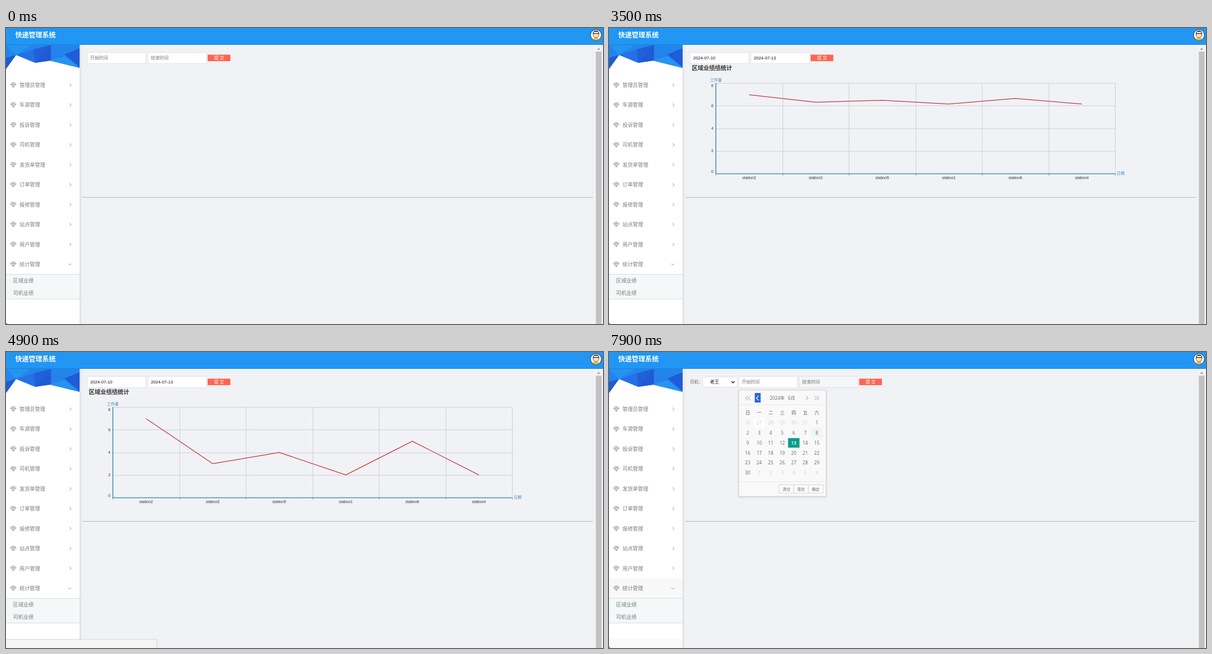
Write an HTML page that moves like this. It is 1063 px wide and 527 px high and loops after 8 s.

```html
<!DOCTYPE html>
<html lang="zh">
<head>
<meta charset="utf-8">
<title>管理系统</title>
<style>
html, body { margin: 0; width: 100%; height: 100%; overflow: hidden; background: #f1f2f5; }
svg { display: block; width: 1063px; height: 527px; }
text { font-family: "Noto Sans CJK SC", "Noto Sans CJK", sans-serif; }
.num { font-family: "Open Sans", "Noto Sans CJK SC", "Noto Sans CJK", sans-serif; }
.arial { font-family: "Liberation Sans", Arial, sans-serif; }
.float { filter: drop-shadow(0 1px 1.5px rgba(0,0,0,.16)); }
.drop { filter: drop-shadow(0 12px 15px rgba(0,0,0,.26)); }
</style>
</head>
<body>
<svg id="stage" viewBox="0 0 1063 527" xmlns="http://www.w3.org/2000/svg">
  <defs>
    <linearGradient id="edge"><stop offset="0" stop-color="#d9dbdf"/><stop offset="1" stop-color="#f1f2f5"/></linearGradient>
    <clipPath id="face"><circle cx="1050.5" cy="12.5" r="9.5"/></clipPath>
  </defs>
</svg>
<script>
const LOOP = 8000;
const stage = document.getElementById('stage');
const windows = [];

function add(parent, tag, attrs = {}) {
  const node = document.createElementNS('http://www.w3.org/2000/svg', tag);
  for (const key in attrs) node.setAttribute(key, attrs[key]);
  parent.appendChild(node);
  return node;
}
const group = (parent, attrs) => add(parent, 'g', attrs);
const rect = (parent, x, y, width, height, fill, more) =>
  add(parent, 'rect', { x, y, width, height, fill, ...more });
const path = (parent, d, stroke, width = 1, more) =>
  add(parent, 'path', { d, stroke, 'stroke-width': width, fill: 'none', ...more });
const shape = (parent, d, fill) => add(parent, 'path', { d, fill });

// y is the middle of the line of text
function label(parent, str, x, y, size, fill, more) {
  const node = add(parent, 'text', { x, y: y + size * 0.37, 'font-size': size, fill, ...more });
  node.textContent = str;
  return node;
}
const mid = { 'text-anchor': 'middle' };

function during(node, from, to = LOOP) {
  windows.push({ node, from, to });
  return node;
}

function drawHeader() {
  rect(stage, 0, 0, 1063, 30, '#2196f3');
  rect(stage, 0, 29, 1063, 1, '#1f83d4');
  label(stage, '快递管理系统', 16.5, 13, 12, '#fff', { 'font-weight': 700 });
  add(stage, 'circle', { cx: 1050.5, cy: 12.5, r: 9.7, fill: '#fff', stroke: '#27323a', 'stroke-width': 1 });
  const a = group(stage, { 'clip-path': 'url(#face)' });
  shape(a, 'M1042 24Q1044 17 1050.5 17T1059 24Z', '#f2c230');
  add(a, 'circle', { cx: 1050.5, cy: 12, r: 5.2, fill: '#fbe3cb', stroke: '#3a3030', 'stroke-width': .8 });
  shape(a, 'M1044.5 10.5Q1045 4.5 1050.5 4.5T1056.5 10.5Z', '#4a3a33');
  rect(a, 1046.5, 7, 8, 2, '#fff');
}

function drawBanner() {
  shape(stage, 'M0 30H131V71L78 58L52 62L18 48L0 73Z', '#2186ec');
  shape(stage, 'M0 53L18 48L0 73Z', '#205bd8');
  shape(stage, 'M0 30H45L18 48Z', '#2494f1');
  shape(stage, 'M18 48L49 38L52 62Z', '#2670e6');
  shape(stage, 'M49 38L80 30L52 62Z', '#2160da');
  shape(stage, 'M80 30V58L52 62Z', '#205ad6');
  shape(stage, 'M80 30L114 53L80 58Z', '#2482ea');
  shape(stage, 'M104 47L131 36V70Z', '#205bd8');
  shape(stage, 'M78 58L104 50L131 71Z', '#2494f1');
}

function drawSidebar() {
  rect(stage, 0, 30, 131, 497, '#fff');
  rect(stage, 131, 30, 4, 497, 'url(#edge)');
  drawBanner();
  during(rect(stage, 0, 403, 131, 35, '#f8f8f8'), 5000);
  during(rect(stage, 0, 511, 131, 16, '#f9f9f9'), 5300);
  rect(stage, 0, 438, 131, 45, '#f5f8f9');
  path(stage, 'M0 438.5H131M0 482.5H131', '#d9dcde');
  const items = ['管理员', '车源', '投诉', '司机', '发货单', '订单', '报修', '站点', '用户', '统计'];
  items.forEach((name, i) => {
    const y = 101.5 + i * 35.45;
    const icon = group(stage, { transform: `translate(13 ${y})` });
    path(icon, 'M-3-3.8H3L5-1L0 4.3L-5-1ZM-5-1H5M-2-1L0 4.3L2-1L0-3.8Z', '#858585', .75);
    label(stage, name + '管理', 24, y, 9.2, '#7c7c7c');
    const last = i === items.length - 1;
    path(stage, last ? `M111 ${y - 1}l2.5 2.5l2.5-2.5` : `M113.4 ${y - 2.5}l2.6 2.7l-2.6 2.7`, '#858585', .9);
  });
  label(stage, '区域业绩', 12.5, 450, 9.2, '#7c7c7c');
  label(stage, '司机业绩', 12.5, 471.5, 9.2, '#7c7c7c');
  shape(stage, 'M0 523.5Q.5 526.5 3.5 527H0Z', '#777');
}

function drawFrame() {
  path(stage, 'M136.5 30V301M1044.5 30V301', '#ebecef');
  path(stage, 'M136 301.5H1045', '#b2b4b6');
  rect(stage, 1049, 30, 13, 497, '#f3f3f4');
  rect(stage, 1050.3, 42, 10.2, 485, '#c1c1c1');
  shape(stage, 'M1052.3 38.7L1055.3 35.2L1058.3 38.7Z', '#a0a0a0');
}

function field(parent, x, hint, fill = '#fff') {
  rect(parent, x + .5, 43.5, 104.5, 20, fill, { stroke: '#dfe1e4' });
  return label(parent, hint, x + 6, 53.5, 7.9, '#757575');
}
const dateText = (parent, str, x) => label(parent, str, x + 6, 53.5, 7.7, '#111', { class: 'arial' });
const caret = (parent, x, from) => during(rect(parent, x + 6.2, 49, 1, 9, '#000'), from, from + 500);

function submit(parent, x) {
  rect(parent, x, 47.5, 40.5, 11.5, '#ff6451');
  label(parent, '提 交', x + 20.3, 53.3, 8, '#fff', { ...mid, 'font-weight': 500 });
}

// Line chart
const VALUES = [7, 3, 4, 2, 5, 2];
const pointX = i => 249.5 + i * 118.5;
const valueY = v => 259.5 - v * 20.1;

function drawChart(parent) {
  const g = during(group(parent), 3500);
  label(g, '区域业绩绩统计', 147.5, 71.5, 10.25, '#333', { 'font-weight': 700 });
  label(g, '工作量', 190.3, 92, 7, '#3f8dc4', mid);
  label(g, '日期', 904, 258.7, 7, '#3f8dc4');
  let grid = '', ticks = '';
  for (let i = 0; i < 7; i++) {
    const x = Math.round(190 + i * 118.5) + .5;
    grid += `M${x} 98V259`;
    ticks += `M${x} 259V262.5`;
  }
  for (let v = 2; v <= 8; v += 2) grid += `M190 ${Math.floor(valueY(v)) + .5}H901`;
  path(g, grid, '#cfd0d2');
  path(g, ticks, '#5a92b5');
  path(g, 'M190.3 98V260.3M189.5 259.5H901.5', '#4a90ba', 1.6);
  [102, 138.5, 178.5, 218.5, 255].forEach((y, i) =>
    label(g, 8 - i * 2, 186, y, 7, '#333', { class: 'arial', 'text-anchor': 'end' }));
  [2, 3, 5, 1, 6, 4].forEach((n, i) =>
    label(g, 'station' + n, pointX(i), 266.5, 7, '#333', { class: 'arial', ...mid }));
  return path(g, '', '#c4373c', 1.25, { 'stroke-linejoin': 'round' });
}

function moveLine(line, t) {
  const k = Math.min(1, Math.max(0, (t - 3453) / 1850));
  const p = k === 1 ? 1 : 1 - 2 ** (-10 * k);
  line.setAttribute('d', 'M' + VALUES.map((v, i) => `${pointX(i)} ${valueY(7 + (v - 7) * p).toFixed(2)}`).join('L'));
}

// Calendar; coordinates are relative to its corner
const popups = [];
const chevron = (x, dir) => `M${x + dir * 2} 10.4l${-dir * 4} 4.1l${dir * 4} 4.1`;

function drawMonth(parent, month, first, length, before) {
  label(parent, '2024年', 69, 14.5, 8.1, '#666', { class: 'num', ...mid });
  label(parent, month + '月', 94.5, 14.5, 8.1, '#666', { class: 'num', ...mid });
  for (let i = 0; i < 42; i++) {
    const n = i - first + 1;
    const inside = n > 0 && n <= length;
    const day = n < 1 ? before + n : inside ? n : n - length;
    const x = 16.5 + (i % 7) * 20.5, y = 58.7 + Math.floor(i / 7) * 17.8;
    const today = inside && day === 13;
    if (month === 6 && i === 1) rect(parent, x - 10, y - 8.5, 20, 17, '#fff');
    if (month === 6 && i === 13) rect(parent, x - 10, y - 8.5, 20.5, 17, '#eff6f3');
    if (today) rect(parent, x - 10.2, y - 8.5, 20.4, 17, '#0d9c8b');
    label(parent, day, x, y, 8.1, today ? '#fff' : inside ? '#666' : '#cfcfcf',
      { class: 'num', ...mid, 'font-weight': today ? 600 : 400 });
  }
}

function calendar(x, start, from, to) {
  const g = during(group(stage, { class: 'float' }), from, to);
  popups.push({ g, x, start });
  rect(g, .5, .5, 155.5, 189, '#f9f9f9', { stroke: '#d4d4d4' });
  path(g, 'M1 26.5H156M1 163.5H156', '#e6e6e6');
  path(g, chevron(14.5, 1) + chevron(19, 1) + chevron(34, 1) + chevron(122, -1) + chevron(137, -1) + chevron(141.5, -1), '#8a8a8a', .9);
  [...'日一二三四五六'].forEach((d, i) => label(g, d, 16.5 + i * 20.5, 40.8, 8, '#555', mid));
  ['清空', '现在', '确定'].forEach((s, i) => {
    rect(g, 72.5 + i * 26, 168.9, 26, 14.8, '#fdfdfd', { stroke: '#cfcfcf', 'stroke-width': .9 });
    label(g, s, 85.5 + i * 26, 176.5, 7, '#666', mid);
  });
  return g;
}
const july = parent => drawMonth(parent, 7, 1, 31, 30);

function bezier(p, x1, y1, x2, y2) {
  const at = (s, a, b) => 3 * a * s * (1 - s) ** 2 + 3 * b * s * s * (1 - s) + s ** 3;
  let lo = 0, hi = 1;
  for (let i = 0; i < 24; i++) {
    const m = (lo + hi) / 2;
    if (at(m, x1, x2) < p) lo = m; else hi = m;
  }
  return at(lo, y1, y2);
}

function movePopup({ g, x, start }, t) {
  const k = Math.min(1, Math.max(0, (t - start) / 300));
  const p = k === 1 ? 1 : bezier(k, .25, .1, .25, 1);
  g.setAttribute('transform', `translate(${x} ${(67.5 + 11.5 * (1 - p)).toFixed(2)})`);
  g.setAttribute('opacity', (.3 + .7 * p).toFixed(3));
}

function drawAreaPage() {
  const g = during(group(stage), 0, 5100);
  during(field(g, 144, '开始时间'), 0, 1200);
  during(dateText(g, '2024-07-10', 144), 1200);
  during(field(g, 252, '结束时间'), 0, 2400);
  during(dateText(g, '2024-07-13', 252), 2400);
  caret(g, 144, 500);
  caret(g, 252, 1700);
  submit(g, 359);
  return drawChart(g);
}

const DRIVERS = ['请选择', '老张', '老李', '老刘', '老叶', '老王', '老魏', '老韩', '老蒋'];

function drawDriverPage() {
  const g = during(group(stage), 5100);
  label(g, '司机：', 144, 53.5, 7.7, '#666');
  rect(g, 166.5, 44.5, 62, 18, '#fff', { stroke: '#dfe1e4', rx: 1 });
  during(label(g, '请选择', 180, 53.5, 8, '#111'), 5100, 6400);
  during(label(g, '老王', 180, 53.5, 8, '#111'), 6400);
  path(g, 'M218.3 52.3l2.6 2.6l2.6-2.6', '#111', 1.4);
  field(g, 230.5, '开始时间');
  field(g, 338, '结束时间', '#f5f6f7');
  caret(g, 230.5, 6700);
  submit(g, 445.5);
}

function drawDropdown() {
  const g = during(group(stage), 5700, 6400);
  rect(g, 166, 62.8, 61, 100.2, '#f8f8f8', { rx: 4, stroke: '#8b8b8b', 'stroke-width': .9, class: 'drop' });
  // row index, from, to
  [[0, 5700, 5800], [3, 5800, 5900], [6, 5900, 6200], [5, 6200, 6400]].forEach(([row, from, to]) => {
    const y = 63.3 + row * 11;
    const bar = row ? rect(g, 166.4, y, 60.2, 11, '#1967d2')
      : shape(g, 'M166.4 74.3V67Q166.4 63.2 170 63.2H223Q226.6 63.2 226.6 67V74.3Z', '#1967d2');
    during(bar, from, to);
    during(label(g, DRIVERS[row], 180, 69 + row * 11, 7.9, '#fff'), from, to);
  });
  DRIVERS.forEach((name, i) => {
    const text = label(g, name, 180, 69 + i * 11, 7.9, '#222');
    const lit = g.querySelectorAll('text[fill="#fff"]');
    const twin = [...lit].find(n => n.textContent === name);
    if (twin) g.insertBefore(text, g.children[1]);
  });
}

function drawPopups() {
  july(calendar(144, 525, 550, 1200));
  july(calendar(252, 1680, 1750, 2400));
  const g = calendar(230.5, 6680, 6750, LOOP);
  july(during(group(g), 0, 7800));
  drawMonth(during(group(g), 7800), 6, 6, 30, 31);
  during(path(g, chevron(34, 1), '#4fae86', 1), 7500, 7900);
  const pick = during(group(g), 7900);
  rect(pick, 29, 5.5, 10.5, 17, '#2f68cf');
  path(pick, chevron(34, 1), '#fff', 1.2);
}

drawHeader();
drawSidebar();
drawFrame();
const line = drawAreaPage();
drawDriverPage();
drawDropdown();
drawPopups();
during(rect(stage, -1, 511.5, 269.5, 17, '#f3f4f5', { stroke: '#d5d7da' }), 4900, 5300);

function render(t) {
  for (const { node, from, to } of windows) node.style.display = t >= from && t < to ? '' : 'none';
  moveLine(line, t);
  popups.forEach(p => movePopup(p, t));
}

const origin = performance.now();
function tick() {
  render(Math.max(0, performance.now() - origin) % LOOP);
  requestAnimationFrame(tick);
}
render(0);
requestAnimationFrame(tick);
</script>
</body>
</html>
```
